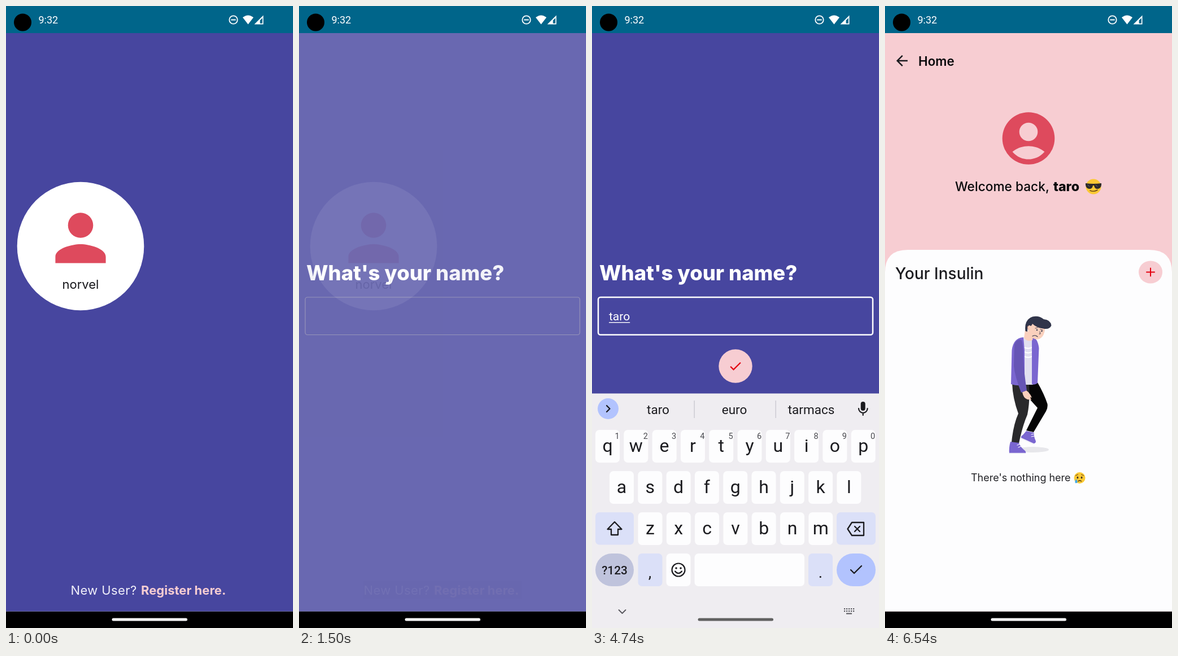
Animation of 508 by 1102 pixels, one loop 6.6 s. Source, as an HTML page:

```html
<!DOCTYPE html>
<html lang="en">
<head>
<meta charset="utf-8">
<title>Sign in flow</title>
<style>
  html, body { margin: 0; width: 100%; height: 100%; overflow: hidden; background: #000; }
  svg { display: block; width: 100vw; height: 100vh; }
  text { font-family: Inter, "Open Sans", sans-serif; white-space: pre; }
  .rb text, text.rb { font-family: Roboto, "Noto Sans", sans-serif; }
  .rb text.wide { font-family: Inter, "Open Sans", sans-serif; }
  .line { fill: none; stroke-linecap: round; stroke-linejoin: round; }
</style>
</head>
<body>
<svg id="stage" viewBox="0 0 508 1102" preserveAspectRatio="none"></svg>
<script>
const LOOP = 6600, STEP = 60;
const BLUE = '#47469f', PINK = '#f7cdd2', TEAL = '#00658a', RED = '#de4a5d', INK = '#1b1b1f';
const USER = 'taro';
const PITCH = 50.3, PAGE_H = 1024.5;

// Markup helpers
const rect = (x, y, w, h, fill, r = 0, more = '') =>
  `<rect x="${x}" y="${y}" width="${w}" height="${h}" rx="${r}" fill="${fill}" ${more}/>`;
const oval = (x, y, rx, ry, fill, more = '') =>
  `<ellipse cx="${x}" cy="${y}" rx="${rx}" ry="${ry}" fill="${fill}" ${more}/>`;
const disc = (x, y, r, fill, more) => oval(x, y, r, r, fill, more);
const shape = (d, fill, more = '') => `<path d="${d}" fill="${fill}" ${more}/>`;
const line = (d, color, w = 2, more = '') =>
  `<path class="line" d="${d}" stroke="${color}" stroke-width="${w}" ${more}/>`;
const label = (x, y, size, str, fill, more = '') =>
  `<text x="${x}" y="${y}" font-size="${size}" fill="${fill}" ${more}>${str}</text>`;
const mid = (x, y, size, str, fill, more = '') =>
  label(x, y, size, str, fill, `text-anchor="middle" ${more}`);
const icon = (x, y, scale, d, fill) =>
  `<path transform="translate(${x} ${y}) scale(${scale})" d="${d}" fill="${fill}"/>`;
const group = (id, body, more = '') => `<g id="${id}" ${more}>${body}</g>`;

const PERSON = 'M12 4a4 4 0 1 0 0 8a4 4 0 1 0 0-8zM12 14c-2.67 0-8 1.34-8 4v2h16v-2c0-2.66-5.33-4-8-4z';
const CHECK = 'M9 16.2L4.8 12l-1.4 1.4L9 19 21 7l-1.4-1.4L9 16.2z';
const ARROW = 'M20 11H7.83l5.59-5.59L12 4l-8 8 8 8 1.41-1.41L7.83 13H20v-2z';

function statusBar() {
  return rect(0, 0, 508, 48, TEAL) + disc(29.5, 29, 15.5, '#000') +
    label(57.5, 31, 18, '9:32', '#fff', 'class="rb"') +
    disc(402.5, 24.5, 7.2, 'none', 'stroke="#fff" stroke-width="1.8"') +
    line('M399 24.5h7', '#fff', 1.8) +
    shape('M428.5 32.5L419 20.2Q428.5 12.6 438 20.2Z', '#fff') +
    shape('M455.5 16.5V32.5H439.5Z', '#fff') +
    shape('M449.6 25.4L453.8 21.2V30.8H449.6Z', TEAL);
}

function welcomePage() {
  return rect(0, 48, 508, PAGE_H, BLUE) +
    oval(132, 425.5, 112.3, 113.7, '#fff') +
    icon(65.1, 343.9, 5.575, PERSON, RED) +
    mid(132, 501, 22, 'norvel', '#16161a') +
    label(114.5, 1043, 22, 'New User?', '#f1f0fa', 'letter-spacing=".4"') +
    label(239, 1043, 22, 'Register here.', PINK, 'font-weight="700"') +
    rect(114, 1018, 280, 32, '#000', 0, 'id="press" opacity="0"');
}

function namePage() {
  return rect(0, 48, 508, PAGE_H, BLUE) +
    label(13, 486, 36.4, "What's your name?", '#fff', 'font-weight="800"') +
    rect(11, 516, 486, 66.5, 'none', 4, 'id="field"') +
    label(30, 557, 21, '', '#fff', 'id="typed" class="rb"') +
    rect(30, 560, 0, 1.4, '#fff', 0, 'id="under"') +
    rect(30, 537, 2, 25, TEAL, 0, 'id="caret"') +
    group('fab', disc(254, 638, 29.7, PINK) + icon(240.6, 624.8, 1.1, CHECK, '#e3000f'));
}

function coolFace(x, y) {
  return `<g transform="translate(${x} ${y})">` + disc(0, 0, 13.5, '#fcc934') +
    shape('M-14-6Q0-4 14-6V-3Q13 4 7 4Q2 4 1-2H-1Q-2 4-7 4Q-13 4-14-3Z', '#2d2a2b') +
    line('M-6 7Q1 10 7 6', '#6b4a14', 1.6) + line('M-10-3l3 3M4-3l3 3', '#6d6a6c', 1) + '</g>';
}

function cryFace(x, y) {
  return `<g transform="translate(${x} ${y})">` + disc(0, 0, 10, '#fcc934') +
    oval(-3.6, -.5, 1.4, 1.9, '#3b3026') + oval(3.6, -.5, 1.4, 1.9, '#3b3026') +
    line('M-7-4l4-2M7-4l-4-2', '#7a5518', 1.1) + line('M-2.5 6Q0 3.5 3 6', '#4a3518', 1.3) +
    shape('M-6 2Q-10 7-7 9.5Q-3 9-4 6Z', '#40a9e8') + '</g>';
}

function sadMan() {
  const purple = '#7a66d0', skin = '#fad0bd', hair = '#30344a';
  const backLeg = shape('M248 672L270 667Q282 688 287.5 705Q288.5 712 285 718L263 755L250 752L270 712L252 692Z', '#050506') +
    shape('M250 753L264 756Q263 763 267 771Q267 775 263 775L241 765Q240 762 244 760Z', purple) +
    line('M240.5 766L263 776', '#eeedf6', 1.6) + line('M259 759l5-1M259 763l5-1', '#fff', 1.1);
  const head = shape('M248 574L263 582L261 592Q252 596 246 588Z', skin) +
    shape('M254 562Q250 579 260 587Q271 595 279 585Q284 577 283 567L258 558Z', skin) +
    shape('M248.5 576Q246 556 261 550.5Q272 547.5 281 555Q293 556 294.5 566Q291 574 280 571.5Q268 570 261 563Q258 569 257 566Q252 564 252 577Z', hair) +
    line('M253 567q-2 3 1 6', '#d99a85', 1) +
    disc(269, 574, 1.2, hair) + disc(277.5, 576, 1.2, hair) +
    line('M266 571l4-1M275 573l4 1M274 577l1 4l-2 0', hair, .9) +
    line('M261 585q5-3 9 1', hair, 1.1);
  return oval(262, 786, 28, 5, '#e7e7eb') +
    group('leg', backLeg) +
    shape('M225 668L255 668Q257 700 252 724Q243 745 237 775L224 773Q227 742 236 722Q226 695 225 668Z', '#29292b') +
    shape('M222 772L237 774Q240 782 248 788Q251 792 247 793H220Q219 782 222 772Z', purple) +
    line('M220 792.5H248', '#eeedf6', 1.4) + line('M234 778l5-2M236 782l5-2', '#fff', 1.1) +
    group('torso',
      shape('M243 587L263 587L262 671L245 671Z', '#e1dff0') +
      line('M247 605q6 3 13 0M247 613q6 3 13 0M247 621q6 3 13 0', '#fff', 2) +
      shape('M245 587Q227 588 224.5 610L223 670Q236 674 247 671L247 610Z', purple) +
      shape('M260 587Q270 587 272.5 606L270 668Q265 672 260 670Z', purple) +
      shape('M243 684L250 681Q257 686 260 694L257 693L259 698L252 697Q245 695 243 684Z', skin) +
      shape('M229 600Q233 589 242 592Q245 600 245 625Q246 650 251 681L241 685Q230 656 228 638Z', '#6655b5') +
      group('head', head));
}

function homePage() {
  return rect(0, 48, 508, PAGE_H, PINK) +
    shape('M0 1072.5V472Q0 432 40 432H468Q508 432 508 472V1072.5Z', '#fdfdfe') +
    icon(15, 82, 1.25, ARROW, INK) +
    label(59, 106, 22.4, 'Home', '#09090b', 'font-weight="600"') +
    disc(254, 234.5, 46.3, RED) + disc(254, 223, 16.3, PINK) +
    icon(198.4, 178.9, 4.63, 'M12 20c-2.03 0-4.43-.82-6.14-2.88C7.55 15.8 9.68 15 12 15s4.45.8 6.14 2.12C16.43 19.18 14.03 20 12 20z', PINK) +
    label(124, 328, 22.7, 'Welcome back,', '#09090b', 'font-weight="500"') +
    label(298, 328, 23.2, USER, '#09090b', 'font-weight="800"') +
    coolFace(369, 320) +
    label(18, 484, 28, 'Your Insulin', INK, 'font-weight="500"') +
    oval(470, 471.5, 21, 20, PINK) + line('M463 471.5h14M470 464.5v14', '#e3000f', 2) +
    `<path id="spin" class="line" style="stroke-linecap:butt" stroke="${TEAL}" stroke-width="5"/>` +
    group('empty', sadMan() + label(152, 842, 18, "There's nothing here", '#222226') + cryFace(344.5, 836));
}

function toolIcons() {
  const c = '#2e2f36';
  let teeth = '';
  for (let a = 0; a < 360; a += 60)
    teeth += rect(-3, -11, 6, 6, c, 1, `transform="translate(318 714) rotate(${a})"`);
  return line('M106 724H94Q91 724 91 721V707Q91 704 94 704H109Q112 704 112 707V718L106 724V718H112', c, 2.2) +
    disc(97.5, 711, 1.3, c) + disc(105.5, 711, 1.3, c) + line('M96.5 715q5 5 9 0', c, 2) +
    mid(173, 720, 17.8, 'GIF', c, 'class="wide" font-weight="800"') +
    rect(236.5, 705, 19, 19.5, 'none', 2, `stroke="${c}" stroke-width="2.2"`) +
    rect(241, 702, 10, 6, c, 2) + line('M241 712h10M241 716h10M241 720h6', c, 1.6) +
    teeth + disc(318, 714, 8.3, c) + disc(318, 714, 3.6, '#efedf1') +
    rect(361.5, 700, 1.3, 28, '#c8c6ce') +
    [399, 406, 413].map(x => disc(x, 714, 2.5, c)).join('');
}

function keyboard() {
  const white = '#fdfdfe', soft = '#dbe0f8', accent = '#b2c3fe';
  const rows = [['qwertyuiop', 6, 751], ['asdfghjkl', 31, 824], ['zxcvbnm', 81.5, 897]];
  let out = rect(0, 686.5, 508, 416, '#efedf1');
  rows.forEach(([keys, left, top], row) => [...keys].forEach((ch, i) => {
    const x = left + i * PITCH;
    out += rect(x, top, 43, 58, white, 7) + mid(x + 21.5, top + 39, 32, ch, INK);
    if (!row) out += mid(x + 38.5, top + 15.5, 14.5, (i + 1) % 10, '#47474d');
  }));
  out += rect(6, 897, 68, 57.5, soft, 7) + rect(433, 897, 69, 57.5, soft, 7) +
    line('M40 914L27.5 927H34V937H46V927H52.5Z', INK, 2.3) +
    line('M460 915H481V938H460L452.5 926.5ZM465 922l9 9M474 922l-9 9', INK, 2.3) +
    rect(6, 970, 68, 58, '#bfc3dc', 29) + mid(40, 1007, 20.8, '?123', INK, 'font-weight="500"') +
    rect(81.5, 970, 43, 58, soft, 7) + mid(102.5, 1013, 28, ',', INK) +
    rect(131.5, 970, 43, 58, white, 7) +
    disc(153, 999, 11.5, 'none', `stroke="${INK}" stroke-width="2.2"`) +
    disc(149, 996, 1.8, INK) + disc(157, 996, 1.8, INK) + line('M147 1001.5q6 7 12 0', INK, 2.2) +
    rect(181.5, 970, 194.5, 58, white, 7) +
    rect(383, 970, 43, 58, soft, 7) + mid(404.5, 1013, 28, '.', INK) +
    rect(433, 970, 69, 58, accent, 29) + line('M458 999l6 6L477 992', INK, 2.3) +
    line('M47.5 1070l6 6l6-6', '#55555b', 1.8) +
    disc(28.5, 713.5, 18.5, accent) + line('', INK, 2.3, 'id="chev"') +
    rect(475.7, 701, 8, 16, INK, 4) + line('M472 713a7.8 7.8 0 0 0 15.6 0M479.7 721v4', INK, 2.2);
  for (let i = 0; i < 10; i++)
    out += rect(446 + (i % 5) * 4, 1067 + (i / 5 | 0) * 4, 2.2, 2.2, '#55555b');
  out += rect(450, 1075.5, 10, 2, '#55555b') + group('tools', toolIcons()) +
    group('words', rect(180.5, 699, 1.3, 31, '#c8c6ce') + rect(324.5, 699, 1.3, 31, '#c8c6ce') +
      [117, 252, 388].map(x => mid(x, 723, 22.5, '', INK, 'class="word"')).join(''));
  return out;
}

const stage = document.getElementById('stage');
stage.innerHTML = rect(0, 0, 508, 1102, '#000') + rect(0, 48, 508, PAGE_H, '#fff') +
  group('welcome', welcomePage()) + group('name', namePage()) + group('home', homePage()) +
  group('keys', keyboard(), 'class="rb"') + statusBar() +
  rect(187.5, 1084.6, 133.5, 5, '#fff', 2.5, 'id="pill"') +
  disc(0, 0, 13, '#fff', 'id="touch"');

const el = {};
stage.querySelectorAll('[id]').forEach(n => el[n.id] = n);
const words = [...stage.querySelectorAll('.word')];
const set = (id, attrs) => { for (const k in attrs) el[id].setAttribute(k, attrs[k]); };
const show = (id, on) => set(id, { opacity: +on });

// Timing helpers
const clamp = v => Math.max(0, Math.min(1, v));
const ramp = (t, from, dur) => clamp((t - from) / dur);
const bezier = (x1, y1, x2, y2) => x => {
  if (x <= 0 || x >= 1) return clamp(x);
  const at = (s, a, b) => 3 * a * s * (1 - s) ** 2 + 3 * b * s * s * (1 - s) + s ** 3;
  let lo = 0, hi = 1;
  for (let i = 0; i < 24; i++) {
    const m = (lo + hi) / 2;
    if (at(m, x1, x2) < x) lo = m; else hi = m;
  }
  return at(lo, y1, y2);
};
const standard = bezier(.4, 0, .2, 1), exit = bezier(.4, 0, 1, 1);
function track(points, t) {
  let i = 1;
  while (i < points.length - 1 && t > points[i][0]) i++;
  const [t0, a] = points[i - 1], [t1, b] = points[i];
  return a + (b - a) * ramp(t, t0, t1 - t0);
}

// Timeline, in ms
const TO_NAME = 1165, TO_HOME = 5010, FADE = 700, FOCUS = 2200;
const KEYS_IN = 2235, KEYS_OUT = 5600, LOADED = 5940;
const TYPED_AT = [3020, 3360, 3700, 4020];
const HINTS = [['t', 'the', 'to'], ['ta', 'take', 'talk'], ['tar', 'tart', 'tarry'], [USER, 'euro', 'tarmacs']];
const TAPS = [[346, 1044, 1000, 1140], [321, 566, 2040, 2160], [254, 640, 4880, 4990]];
const PILL = [[0, 252], [2400, 252], [2600, 145], [3060, 145], [3700, 97], [5500, 97], [5640, 26], [5790, 26], [5820, 252], [6600, 252]];

function drawField(t) {
  const n = TYPED_AT.filter(at => t >= at).length;
  el.typed.textContent = USER.slice(0, n);
  const width = n ? el.typed.getComputedTextLength() : 0;
  const last = n ? TYPED_AT[n - 1] : FOCUS;
  const focused = t >= FOCUS;
  set('field', { stroke: focused ? '#fff' : '#8480ab', 'stroke-width': focused ? 2.5 : 1.2 });
  set('under', { width });
  set('caret', { x: 30 + width, opacity: +(focused && (t - last) % 1000 < 500) });
  set('fab', { opacity: ramp(t, 3070, 300) });
  const hints = t >= 3110 && t < KEYS_OUT - 20;
  show('tools', t < 3110);
  show('words', hints);
  if (hints) words.forEach((w, i) => w.textContent = HINTS[n - 1][i]);
  set('chev', { d: t < 3110 ? 'M31 708l-5.5 5.5l5.5 5.5' : 'M26 708l5.5 5.5l-5.5 5.5' });
}

function drawKeys(t) {
  const rise = standard(ramp(t, KEYS_IN, 275));
  const drop = exit(ramp(t, KEYS_OUT, 200));
  const alpha = t < KEYS_OUT ? rise ** 1.15 : clamp(1 - 2 * drop);
  set('keys', { transform: `translate(0 ${415 * (1 - rise + drop)})`, opacity: alpha });
  const g = Math.round(track(PILL, t));
  set('pill', { fill: `rgb(${g},${g},${g})` });
}

function drawSpinner(t) {
  const age = Math.max(0, t - 4901), phase = age % 1332;
  const tail = 290 * standard(ramp(phase, 666, 666));
  const sweep = Math.max(1, 290 * standard(ramp(phase, 0, 666)) - tail);
  const start = -122 + age / 1332 * 360 + Math.floor(age / 1332) * 290 + tail;
  const at = deg => {
    const a = deg * Math.PI / 180;
    return `${254 + 27.2 * Math.cos(a)} ${545 + 27.2 * Math.sin(a)}`;
  };
  set('spin', {
    d: `M${at(start)}A27.2 27.2 0 ${sweep > 180 ? 1 : 0} 1 ${at(start + sweep)}`,
    opacity: +(t < LOADED)
  });
}

function drawMan(t) {
  const sway = Math.sin((t - 6540) / 1600 * 2 * Math.PI);
  show('empty', t >= LOADED);
  set('head', { transform: `rotate(${3 * sway} 254 588)` });
  set('torso', { transform: `rotate(${.8 * sway} 246 670)` });
  set('leg', { transform: `rotate(${-2 * sway} 260 670)` });
}

function drawTouch(t) {
  const tap = TAPS.find(([, , down, up]) => t >= down && t < up + 330);
  set('touch', tap
    ? { cx: tap[0], cy: tap[1], opacity: .2 * ramp(t, tap[2] - 30, 60) * (1 - ramp(t, tap[3], 330)) }
    : { opacity: 0 });
  set('press', { opacity: .18 * ramp(t, 1000, 90) });
}

function draw(t) {
  const a = standard(ramp(t, TO_NAME, FADE)), b = standard(ramp(t, TO_HOME, FADE));
  set('welcome', { opacity: 1 - a });
  set('name', { opacity: t < TO_HOME ? a : 1 - b });
  set('home', { opacity: b });
  drawField(t);
  drawKeys(t);
  drawSpinner(t);
  drawMan(t);
  drawTouch(t);
}

function tick() {
  draw(Math.floor(performance.now() % LOOP / STEP) * STEP);
  requestAnimationFrame(tick);
}
tick();
</script>
</body>
</html>
```
